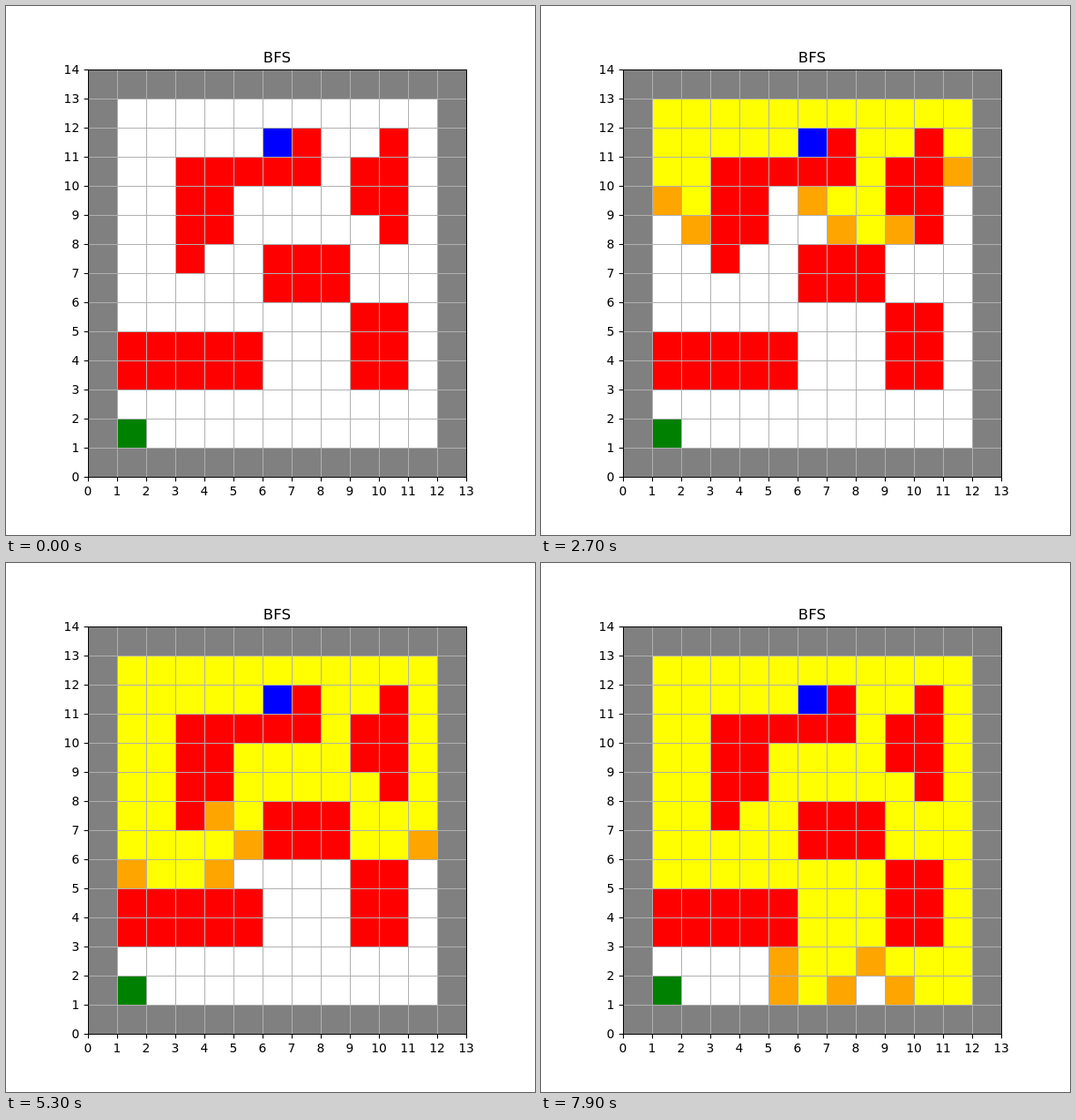
These frames come from a looping animation (600 px wide and 600 px high, 8 s). An HTML page:

```html
<!DOCTYPE html>
<html lang="en">
<head>
<meta charset="utf-8">
<title>Breadth-first search</title>
<style>
  html, body { margin: 0; width: 100%; height: 100%; overflow: hidden; background: #fff; }
  svg { display: block; width: 600px; height: 600px; }
  text { font: 13.889px "DejaVu Sans", sans-serif; fill: #000; }
  .title { font-size: 16.667px; text-anchor: middle; }
  .x { text-anchor: middle; }
  .y { text-anchor: end; }
  .grid { stroke: #b0b0b0; }
  .tick { stroke: #000; stroke-width: 1.11; }
  rect, .grid { shape-rendering: crispEdges; }
</style>
</head>
<body>
<svg id="stage" viewBox="0 0 600 600"></svg>
<script>
const COLS = 13, ROWS = 14, CELL = 33, LEFT = 93, BOTTOM = 534;
const STEP_MS = 100, LOOP_MS = 8000;
const COLORS = {
  free: '#ffffff', border: '#808080', wall: '#ff0000', start: '#0000ff',
  goal: '#008000', open: '#ffa500', closed: '#ffff00'
};
const START = [6, 11], GOAL = [1, 1];
// Blocks as [first column, bottom row, width, height]
const WALLS = [
  [7, 11, 1, 1], [3, 10, 5, 1], [3, 8, 2, 2], [3, 7, 1, 1],
  [10, 8, 1, 4], [9, 9, 1, 2], [6, 6, 3, 2], [9, 3, 2, 3], [1, 3, 5, 2]
];
const DIRECTIONS = [[0, 1], [1, 0], [0, -1], [-1, 0]];

const stage = document.getElementById('stage');
const px = x => LEFT + CELL * x;
const py = y => BOTTOM - CELL * y;
const key = (x, y) => y * COLS + x;

function add(tag, attrs, text = '') {
  const node = document.createElementNS('http://www.w3.org/2000/svg', tag);
  for (const name in attrs) node.setAttribute(name, attrs[name]);
  node.textContent = text;
  return stage.appendChild(node);
}

const line = (cls, x1, y1, x2, y2) => add('line', { class: cls, x1, y1, x2, y2 });

function kindOf(x, y) {
  if (x === 0 || y === 0 || x === COLS - 1 || y === ROWS - 1) return 'border';
  if (x === START[0] && y === START[1]) return 'start';
  if (x === GOAL[0] && y === GOAL[1]) return 'goal';
  const inside = ([c, r, w, h]) => x >= c && x < c + w && y >= r && y < r + h;
  return WALLS.some(inside) ? 'wall' : 'free';
}

const cells = [];
for (let y = 0; y < ROWS; y++) {
  for (let x = 0; x < COLS; x++) {
    const kind = kindOf(x, y);
    const rect = add('rect', {
      x: px(x), y: py(y + 1), width: CELL, height: CELL, fill: COLORS[kind]
    });
    cells.push({ x, y, kind, rect, opened: Infinity, closed: Infinity });
  }
}

// One cell leaves the queue per step; record when each is opened and closed.
function search() {
  const first = cells[key(...START)];
  first.opened = 0;
  const queue = [first];
  for (let step = 1; queue.length; step++) {
    const cell = queue.shift();
    cell.closed = step;
    for (const [dx, dy] of DIRECTIONS) {
      const next = cells[key(cell.x + dx, cell.y + dy)];
      if (next.kind === 'free' && next.opened === Infinity) {
        next.opened = step;
        queue.push(next);
      }
    }
  }
}

function drawAxes() {
  const right = px(COLS), top = py(ROWS);
  for (let x = 0; x <= COLS; x++) line('grid', px(x) + .5, top, px(x) + .5, BOTTOM);
  for (let y = 0; y <= ROWS; y++) line('grid', LEFT, py(y) + .5, right, py(y) + .5);
  for (let x = 0; x <= COLS; x++) {
    line('tick', px(x) + .5, BOTTOM + .5, px(x) + .5, BOTTOM + 5.36);
    add('text', { class: 'x', x: px(x), y: BOTTOM + 21 }, x);
  }
  for (let y = 0; y <= ROWS; y++) {
    line('tick', LEFT - 4.36, py(y) + .5, LEFT + .5, py(y) + .5);
    add('text', { class: 'y', x: LEFT - 9.72, y: py(y) + 5 }, y);
  }
  add('rect', {
    x: LEFT + .5, y: top + .5, width: right - LEFT, height: BOTTOM - top,
    fill: 'none', stroke: '#000'
  });
  add('text', { class: 'title', x: 307.5, y: 64 }, 'BFS');
}

function render(time) {
  const step = Math.floor(time % LOOP_MS / STEP_MS);
  for (const cell of cells) {
    if (cell.kind !== 'free') continue;
    const state = step >= cell.closed ? 'closed' : step >= cell.opened ? 'open' : 'free';
    cell.rect.setAttribute('fill', COLORS[state]);
  }
}

search();
drawAxes();
render(0);
const began = performance.now();
requestAnimationFrame(function tick() {
  render(performance.now() - began);
  requestAnimationFrame(tick);
});
</script>
</body>
</html>
```
